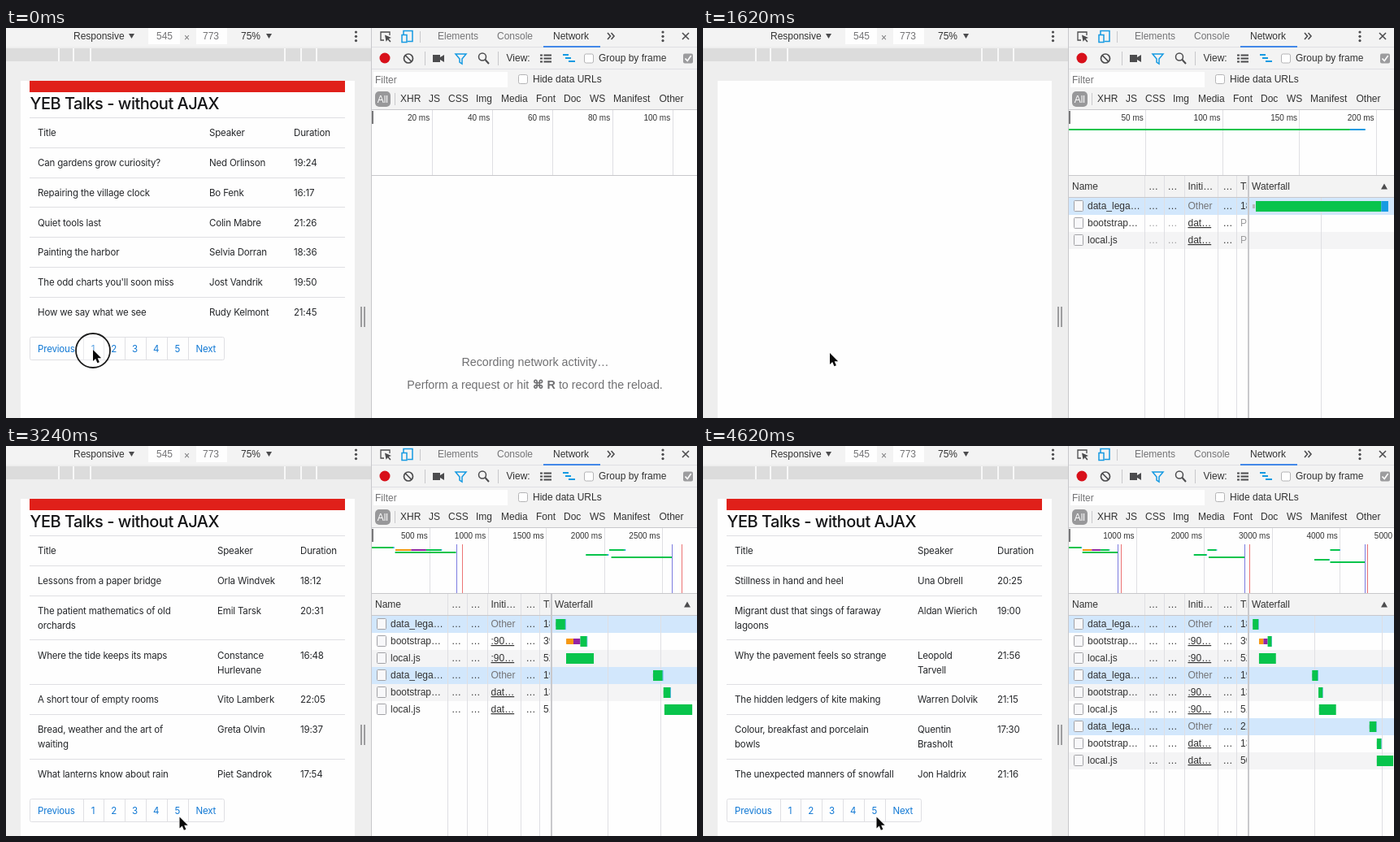
An HTML page that plays this animation: 850x480 px, repeating every 4680 ms.

```html
<!DOCTYPE html>
<html lang="en">
<head>
<meta charset="utf-8">
<title>Pagination without AJAX</title>
<style>
html, body { margin: 0; width: 100%; height: 100%; overflow: hidden; background: #fff; }
svg { display: block; width: 850px; height: 480px; }
text { font: 12px "Liberation Sans", Arial, sans-serif; fill: #333; }
.page text { font: 11.5px Inter, "Open Sans", sans-serif; letter-spacing: -.17px; fill: #25272a; }
.page .head { font-size: 20px; font-weight: 500; letter-spacing: -.5px; fill: #141416; }
.page .link { fill: #1078d4; }
.page .pressed { fill: #0b4f94; }
.tick { font-size: 10px; text-anchor: end; }
.dim { fill: #747476; }
.faint { fill: #9c9c9e; }
.on { fill: #fff; }
.under { text-decoration: underline; }
.hint { font-size: 14.3px; text-anchor: middle; fill: #707072; }
</style>
</head>
<body>
<svg viewBox="0 0 850 480" xmlns="http://www.w3.org/2000/svg">
  <defs><clipPath id="narrow"><rect x="657" y="182" width="12" height="298"/></clipPath></defs>
  <g id="frame"></g>
  <g id="page" class="page"></g>
  <g id="net"></g>
  <g id="pointer">
    <circle id="ring" cy="1" r="21" fill="#fff" fill-opacity=".3" stroke="#1c1c1c" stroke-width="1.8"/>
    <path d="M0 0V14L3.2 11 5.4 16.2 7.9 15.2 5.7 10.2H10.2Z" fill="#0a0a0a" stroke="#fff" stroke-width="1" paint-order="stroke"/>
  </g>
</svg>
<script>
const LOOP = 4680, STEP = 60;
const WHITE = '#fefefe', BAR = '#f3f3f3', LINE = '#dfdfe3', EDGE = '#c8c8cb', INK = '#4c4c4e';
const GREEN = '#08c44c', BLUE = '#169ae2', ORANGE = '#f8980e', PURPLE = '#9424a4';
const $ = id => document.getElementById(id);

const text = (x, y, s, cls = '') => `<text x="${x}" y="${y}" class="${cls}">${s}</text>`;
const rect = (x, y, w, h, fill, more = '') =>
  `<rect x="${x}" y="${y}" width="${w}" height="${h}" fill="${fill}" ${more}/>`;
const path = (d, stroke, w = 1, fill = 'none') =>
  `<path d="${d}" stroke="${stroke}" stroke-width="${w}" fill="${fill}"/>`;
const snap = v => Math.floor(v) + .5;
const vline = (x, y1, y2, c = LINE, w = 1) => path(`M${w === 1 ? snap(x) : x} ${y1}V${y2}`, c, w);
const hline = (y, x1, x2, c = LINE) => path(`M${x1} ${snap(y)}H${x2}`, c);
const dots = x => [5, 10.3, 15.6].map(y => `<circle cx="${x}" cy="${y}" r="1.6" fill="${INK}"/>`).join('');
const box = (x, y) => rect(x, y, 11, 11, WHITE, 'rx="2" stroke="#b4b4b6"');

// ---- fixed chrome of both panels

function drawFrame() {
  const arrow = x => path(`M${x} 7h7l-3.5 6z`, 'none', 0, INK);
  const left = rect(0, 0, 449, 480, '#eeeeee') + rect(0, 0, 449, 23, BAR) +
    rect(175, 0, 39, 20, WHITE) + rect(234, 0, 38, 20, WHITE) +
    text(83, 14, 'Responsive') + arrow(151) +
    text(185, 14, '545', 'dim') + text(219, 15.5, '×', 'dim') + text(242, 14, '773', 'dim') +
    text(289, 14, '75%') + arrow(320) + dots(430.5) +
    rect(0, 25, 449, 16, '#dcdcdc') +
    [65, 83, 104, 343, 363, 382].map(x => vline(x, 25, 41, '#f8f8f8', 2)).join('') +
    rect(18, 65, 411, 415, WHITE) +
    vline(437, 343, 368, '#88888a', 1.6) + vline(441, 343, 368, '#88888a', 1.6);

  const icons =
    path('M472 9V5H461V15H465', INK, 1.3) + path('M466 8.500l8 3.500-3.200 1.200 2.700 3.300-1.200 1-2.700-3.300-2 2.600z', 'none', 0, INK) +
    path('M489 8V3.500H500V16.500H494M487 8.500h6v9h-6z', BLUE, 1.5) + vline(509.5, 4, 18, EDGE) +
    path('M740 6l3.500 4-3.500 4M744.500 6l3.500 4-3.500 4', INK, 1.6) + dots(808) +
    path('M832 6l8 8M840 6l-8 8', INK, 1.6) +
    '<circle cx="466" cy="37" r="6.500" fill="#d8101a"/>' +
    `<circle cx="495" cy="37.500" r="5.500" fill="none" stroke="${INK}" stroke-width="1.700"/>` +
    path('M491 33.500l8 8', INK, 1.7) + vline(515.5, 29, 46, EDGE) +
    path('M525 33h9v3l5-3v9l-5-3v3h-9z', 'none', 0, INK) +
    path('M553 32h13l-5 6v6l-3-2v-4z', BLUE, 1.5) +
    `<circle cx="586" cy="35.500" r="4.500" fill="none" stroke="${INK}" stroke-width="1.500"/>` +
    path('M589.500 39l4.500 5', INK, 2) + vline(605.5, 29, 46, EDGE) +
    path('M657 33.500h3m1.500 0h9.500M657 37.500h3m1.500 0h9.500M657 41.500h3m1.500 0h9.500', INK, 2.2) +
    path('M685 33h7M688 37h7M692 41h8', BLUE, 2.2) + box(711.5, 32) +
    rect(833, 31.5, 12, 12, '#9c9c9e', 'rx="2"') + path('M835.500 37.500l2.700 3 4.500-6.500', '#fff', 1.6);

  const filters = [['XHR', 485], ['JS', 520], ['CSS', 544], ['Img', 578], ['Media', 609], ['Font', 652],
    ['Doc', 686], ['WS', 718], ['Manifest', 747], ['Other', 803.5]];
  const right = rect(450, 0, 400, 480, WHITE) + rect(450, 0, 400, 100, BAR) +
    hline(23.5, 450, 850) + hline(50.5, 450, 850) + hline(100.5, 450, 850, EDGE) + hline(181.5, 450, 850, EDGE) +
    rect(661, 22, 70, 2, '#4288e8') +
    text(531, 14, 'Elements', 'dim') + text(604, 14, 'Console', 'dim') + text(673, 14, 'Network') + icons +
    text(615.5, 41, 'View:') + text(729, 41, 'Group by frame') +
    rect(452, 54, 165, 19, WHITE) + text(454, 68, 'Filter', 'dim') +
    box(630.5, 57.5) + text(648, 67, 'Hide data URLs') +
    rect(454, 78, 19, 19, '#98989a', 'rx="5"') + text(456.7, 91.5, 'All', 'on') + vline(478.5, 80, 95, EDGE) +
    filters.map(([s, x]) => text(x, 91, s)).join('') + vline(449.5, 0, 480, EDGE);
  $('frame').innerHTML = left + right;
}

// ---- web page: "|" breaks a cell into two lines

const PAGES = {
  1: { cols: [39, 250, 354], rows: [
    ['Can gardens grow curiosity?', 'Ned Orlinson', '19:24'],
    ['Repairing the village clock', 'Bo Fenk', '16:17'],
    ['Quiet tools last', 'Colin Mabre', '21:26'],
    ['Painting the harbor', 'Selvia Dorran', '18:36'],
    ["The odd charts you'll soon miss", 'Jost Vandrik', '19:50'],
    ['How we say what we see', 'Rudy Kelmont', '21:45']] },
  3: { cols: [39, 255, 362], rows: [
    ['My plan: Let us share rainwater', 'Perry Ostelland', '25:50'],
    ['The curious future of the hand-|drawn alphabet', 'Lorn Bek', '8:47'],
    ['Two Lanterns per Room', 'Bernhard|Oltravanti', '17:37'],
    ["A 12-year-old's wooden sailboat", 'Milena Toveg', '24:41'],
    ['Whistling on stilts, aged 15', 'Rosalind Vep', '24:05'],
    ['Clever buckets to fill a well', 'Ida Frolt', '15:06']] },
  4: { cols: [39, 260, 362], rows: [
    ['Lessons from a paper bridge', 'Orla Windvek', '18:12'],
    ['The patient mathematics of old|orchards', 'Emil Tarsk', '20:31'],
    ['Where the tide keeps its maps', 'Constance|Hurlevane', '16:48'],
    ['A short tour of empty rooms', 'Vito Lamberk', '22:05'],
    ['Bread, weather and the art of|waiting', 'Greta Olvin', '19:37'],
    ['What lanterns know about rain', 'Piet Sandrok', '17:54']] },
  5: { cols: [39, 264, 362], rows: [
    ['Stillness in hand and heel', 'Una Obrell', '20:25'],
    ['Migrant dust that sings of faraway|lagoons', 'Aldan Wierich', '19:00'],
    ['Why the pavement feels so strange', 'Leopold|Tarvell', '21:56'],
    ['The hidden ledgers of kite making', 'Warren Dolvik', '21:15'],
    ['Colour, breakfast and porcelain|bowls', 'Quentin|Brasholt', '17:30'],
    ['The unexpected manners of snowfall', 'Jon Haldrix', '21:16']] }
};
const TABS = [['Previous', 29.5, 39], ['1', 95.5, 104.8], ['2', 120.5, 129.3], ['3', 146, 155],
  ['4', 172, 181], ['5', 198, 207.5], ['Next', 224.5, 233.5]];

function drawPage(id, focus) {
  const page = PAGES[id];
  if (!page) return '';
  let y = 110.5;
  let out = rect(29, 65, 388, 14, '#e0201a') + text(29.5, 100, 'YEB Talks - without AJAX', 'head');
  for (const row of [['Title', 'Speaker', 'Duration'], ...page.rows]) {
    const cells = row.map(c => c.split('|'));
    out += hline(y, 29, 417);
    cells.forEach((lines, i) => lines.forEach((s, n) => {
      out += text(page.cols[i], y + 22.7 + 18 * n, s);
    }));
    y += 36.8 + 18 * (Math.max(...cells.map(c => c.length)) - 1);
  }
  const top = snap(y + 12.7), right = 268.5;
  out += rect(29.5, top, 239, 28, WHITE, `rx="2" stroke="${LINE}"`);
  TABS.forEach(([s, x, tx], i) => {
    const end = i < 6 ? TABS[i + 1][1] : right, pressed = s === String(focus);
    if (i) out += vline(x, top, top + 28);
    if (pressed) out += rect(x, top, end - x, 28, '#e2e4e8', 'stroke="#b8bfc8" stroke-width="3"');
    out += text(tx, top + 18.5, s, pressed ? 'pressed' : 'link');
  });
  return out;
}

// ---- network panel: [kind, start, end, time column], times in ms

const KINDS = ['data_lega…', 'bootstrap…', 'local.js'];
const REQS = [[0, 0, 193, 184], [1, 200, 603, 392], [2, 200, 724, 521],
  [0, 1841, 2036, 195], [1, 2042, 2183, 137], [2, 2060, 2587, 517],
  [0, 3617, 3845, 218], [1, 3850, 4000, 136], [2, 3850, 4360, 507]];
const MARKS = [[730, 778], [2587, 2670], [4365, 4407]];

// from: when it appears, now: request clock, unit/px: ruler, ov: overview px per ms, wf: waterfall px per ms
const NET = [
  { from: 0, now: -1, unit: 20, px: 74, ov: 0, wf: 0, grid: [] },
  { from: 1440, now: 200, unit: 50, px: 94.6, ov: 1.89, wf: .865, grid: [760.5] },
  { from: 1740, now: 610, unit: 200, px: 119, ov: .595, wf: .275, grid: [813] },
  { from: 1860, now: 800, unit: 200, px: 99.5, ov: .4975, wf: .2265, grid: [787, 840] },
  { from: 2520, now: 2040, unit: 500, px: 90, ov: .18, wf: .085, grid: [760, 845] },
  { from: 2580, now: 2190, unit: 500, px: 81.7, ov: .164, wf: .0805, grid: [754.5, 836] },
  { from: 2880, now: 2700, unit: 500, px: 71.5, ov: .143, wf: .065, grid: [740, 805] },
  { from: 3480, now: 3845, unit: 1000, px: 104.3, ov: .0835, wf: .046, grid: [766] },
  { from: 3540, now: 4010, unit: 1000, px: 104.3, ov: .0835, wf: .044, grid: [762.5] },
  { from: 3960, now: 4500, unit: 1000, px: 83.4, ov: .0835, wf: .0397, grid: [752.5, 835.5] }
];

// coloured phases of one request
function phases([kind, a, b]) {
  if (kind === 1 && a < 1000) return [[a + 3, 338, ORANGE], [338, 468, PURPLE], [468, b - 8, GREEN, 1], [b - 8, b, BLUE, 1]];
  return kind === 2 ? [[a, b, GREEN, 1]] : [[a, b - 10, GREEN, 1], [b - 10, b, BLUE, 1]];
}

function drawOverview(s) {
  let out = vline(451, 102, 118, '#78787a', 2);
  for (let n = 1; n < 6; n++) {
    const x = 450 + s.px * n;
    out += vline(x, 101, 181) + text(x - 2.8, 113.5, s.unit * n + ' ms', 'tick');
  }
  let lane = 0;
  for (const r of REQS) {
    const y = r[0] === 1 ? 127 : [124, 130, 133, 136, 139, 142][lane++];
    if (r[2] > s.now) continue;
    for (const [a, b, c] of phases(r)) out += rect(450 + a * s.ov, y, (b - a) * s.ov, 2, c);
  }
  for (const [dom, load] of MARKS) {
    if (load > s.now) break;
    out += vline(450 + dom * s.ov, 121, 181, '#7c7ce0') + vline(450 + load * s.ov, 121, 181, '#ec7474');
  }
  return out;
}

function drawRows(s) {
  const rows = REQS.filter(r => r[1] <= s.now);
  if (!rows.length) {
    return text(651, 416, 'Recording network activity…', 'hint') +
      text(650.5, 444, 'Perform a request or hit <tspan font-weight="bold">⌘ R</tspan> to record the reload.', 'hint');
  }
  const lastLoad = Math.floor((rows.length - 1) / 3);
  let back = rect(450, 182, 400, 26, BAR), front = '', narrow = text(661, 199, 'Time');
  rows.forEach((r, i) => {
    const [kind, a, b, time] = r, y = 219 + 21 * i, done = b <= s.now, base = y + 4;
    const fill = !kind ? '#d2e7fc' : i % 2 ? WHITE : '#f4f4f5';
    const tone = done ? '' : 'faint';
    back += rect(450, y - 10, 400, 21, fill);
    front += rect(456.5, y - 6.5, 11, 13, '#f8f8fa', 'rx="1" stroke="#a2a2a6"') + text(473, base, KINDS[kind]) +
      text(548, base, '…', tone) + text(571.5, base, '…', tone) + text(639.5, base, '…') +
      (kind ? text(596.5, base, Math.floor(i / 3) < lastLoad ? ':90…' : 'dat…', 'under') : text(596.5, base, 'Other', 'dim'));
    narrow += text(661, base, done ? time + ' ms' : 'Pending', done ? '' : 'faint');
    if (!done) return;
    front += rect(676 + a * s.wf, y - 2, 3, 5, '#b8b8ba');
    for (const [p, q, c, thick] of phases(r)) {
      const h = thick ? 13 : 7, lead = !kind && p === a ? Math.min(4, s.wf * 5) : 0;
      front += rect(676 + p * s.wf + lead, y + .5 - h / 2, (q - p) * s.wf - lead, h, c);
    }
  });
  const lines = [543, 567, 592, 633, 656].map(x => vline(x, 182, 480)).join('') +
    s.grid.map(x => vline(x, 208, 480)).join('') + vline(671, 182, 480, '#c9c9cc', 2);
  const head = hline(208.5, 450, 850, EDGE) + text(454, 199, 'Name') + text(548, 199, '…') + text(571.5, 199, '…') +
    text(596.5, 199, 'Initi…') + text(639.5, 199, '…') + text(675, 199, 'Waterfall') +
    path('M834 198.500l4-7 4 7z', 'none', 0, INK);
  return back + lines + head + front + `<g clip-path="url(#narrow)">${narrow}</g>`;
}

// ---- timeline

const VIEWS = [[0, 1], [1380, 1, 3], [1560, 0], [1800, 3], [2400, 3, 4], [2580, 0],
  [2880, 4], [3300, 4, 5], [3540, 0], [3840, 5]];
const CLICKS = [[0, 180], [1320, 1440], [2340, 2460], [3300, 3420]];
const MOVES = [[0, 107, 396], [240, 107, 396], [900, 160, 402], [1080, 160, 402], [1320, 156, 400],
  [1620, 156, 400], [2040, 190, 433], [2160, 190, 433], [2340, 187, 432], [2880, 187, 432],
  [3240, 213.5, 456.5], [LOOP, 213.5, 456.5]];

function pointerAt(t) {
  const i = MOVES.findIndex(m => m[0] > t);
  const [t0, x0, y0] = MOVES[i - 1], [t1, x1, y1] = MOVES[i];
  const p = (t - t0) / (t1 - t0), e = p * p * (3 - 2 * p);
  return [x0 + (x1 - x0) * e, y0 + (y1 - y0) * e];
}

let shownView, shownNet;
function show(t) {
  const view = VIEWS.filter(v => v[0] <= t).pop();
  const net = NET.filter(n => n.from <= t).pop();
  if (view !== shownView) $('page').innerHTML = drawPage(view[1], view[2]);
  if (net !== shownNet) $('net').innerHTML = drawOverview(net) + drawRows(net);
  shownView = view;
  shownNet = net;
  $('pointer').setAttribute('transform', `translate(${pointerAt(t)})`);
  $('ring').setAttribute('visibility', CLICKS.some(([a, b]) => t >= a && t < b) ? 'visible' : 'hidden');
}

drawFrame();
const start = performance.now();
function tick() {
  const t = (performance.now() - start) % LOOP;
  show(Math.floor(t / STEP) * STEP);
  requestAnimationFrame(tick);
}
tick();
</script>
</body>
</html>
```
